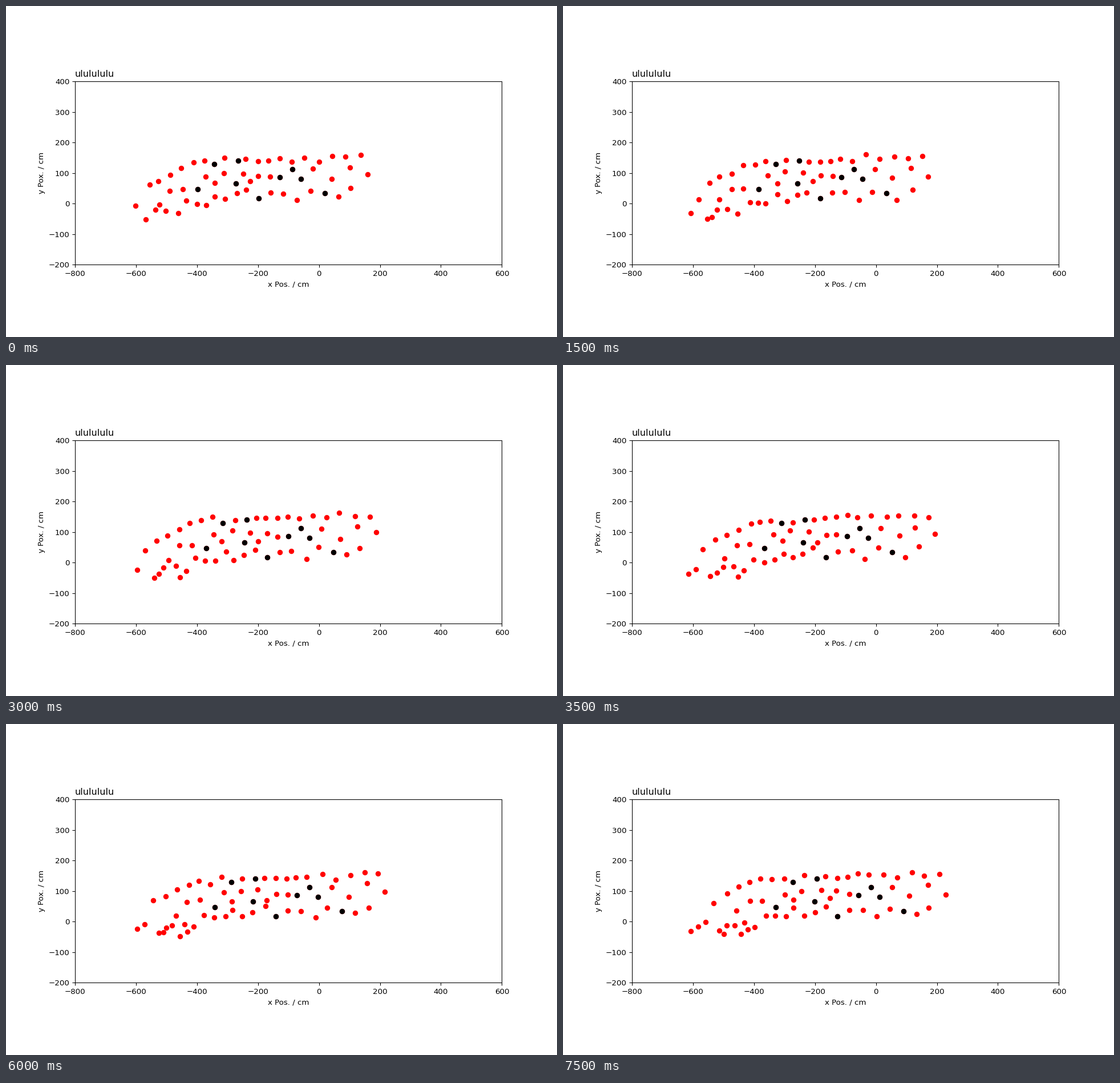
A matplotlib script that plays this animation: 966x580 px, repeating every 8 s.

```python
import numpy as np
import matplotlib.pyplot as plt
from matplotlib.animation import FuncAnimation

FRAMES, INTERVAL = 16, 500
SPEED = 4.7     # cm per step
NEWCOMERS = 7

# Lanes of walkers: weave height, weave rate, key points (place in line, x, y)
LANES = [
    (5, 2.77, [(0, -599, -1), (1, -558, 57), (5, -412, 132),
               (14, -93, 148), (19, 137, 154)]),
    (17, 2.77, [(0, -526, 16), (4, -369, 83), (10, -196, 85),
                (15, -16, 92), (18, 158, 106)]),
    (-15, 2.285, [(0, -568, -38), (5, -399, -3), (8, -306, 25),
                  (11, -201, 31), (18, 104, 32)]),
]
LEADERS = np.array([(-398, 47), (-343, 130), (-272, 67), (-265, 141),
                    (-197, 18), (-128, 87), (-87, 112), (-59, 81), (20, 34)])


def lane_dots(step, weave, rate, knots):
    """Walk each dot forward and keep it on the curve of its lane."""
    place, kx, ky = np.transpose(knots)
    k = np.arange(place[-1] + 1)
    x = np.interp(k, place, kx) + SPEED * step
    # image y points up, so a positive weave pulls the dot down
    y = np.interp(x, kx, ky) - weave * np.cos(rate * (k - 7))
    return np.column_stack([x, y])


def lanes(step):
    return np.concatenate([lane_dots(step, *lane) for lane in LANES])


def newcomers(step):
    """Dots that join the tail from below, one every second step."""
    k = np.arange(NEWCOMERS)
    age = step - (1 + 2 * k)
    spot = k % 3
    dots = np.column_stack([-615 + 78 * spot + 4 * age,
                            -37 - 7 * spot + 2.6 * age])
    return dots[age >= 0]


# Each leader takes the place of the nearest free dot
first = lanes(0)
free = np.ones(len(first), bool)
for leader in LEADERS:
    gap = np.hypot(*(first - leader).T)
    free[np.argmin(np.where(free, gap, np.inf))] = False

# Small unsteady steps around the drift
sway = np.random.default_rng(4).normal(0, (2.5, 4), (FRAMES, free.sum(), 2))

# Pixel size 966 x 580
fig, ax = plt.subplots(figsize=(10, 6.00415), dpi=96.6)
ax.set_aspect("equal")
ax.set(xlim=(-800, 600), ylim=(-200, 400),
       xlabel="x Pos. / cm", ylabel="y Pox. / cm")
ax.set_title("ululululu", loc="left")
red, = ax.plot([], [], "ro")
black, = ax.plot([], [], "ko")


def update(step):
    ahead = LEADERS + (SPEED * step, 0)
    crowd = lanes(step)[free] + sway[step]
    red.set_data(*np.concatenate([crowd, newcomers(step), ahead]).T)
    black.set_data(*ahead.T)
    return red, black


anim = FuncAnimation(fig, update, frames=FRAMES, interval=INTERVAL,
                     repeat=True, repeat_delay=0)
plt.show()
```
